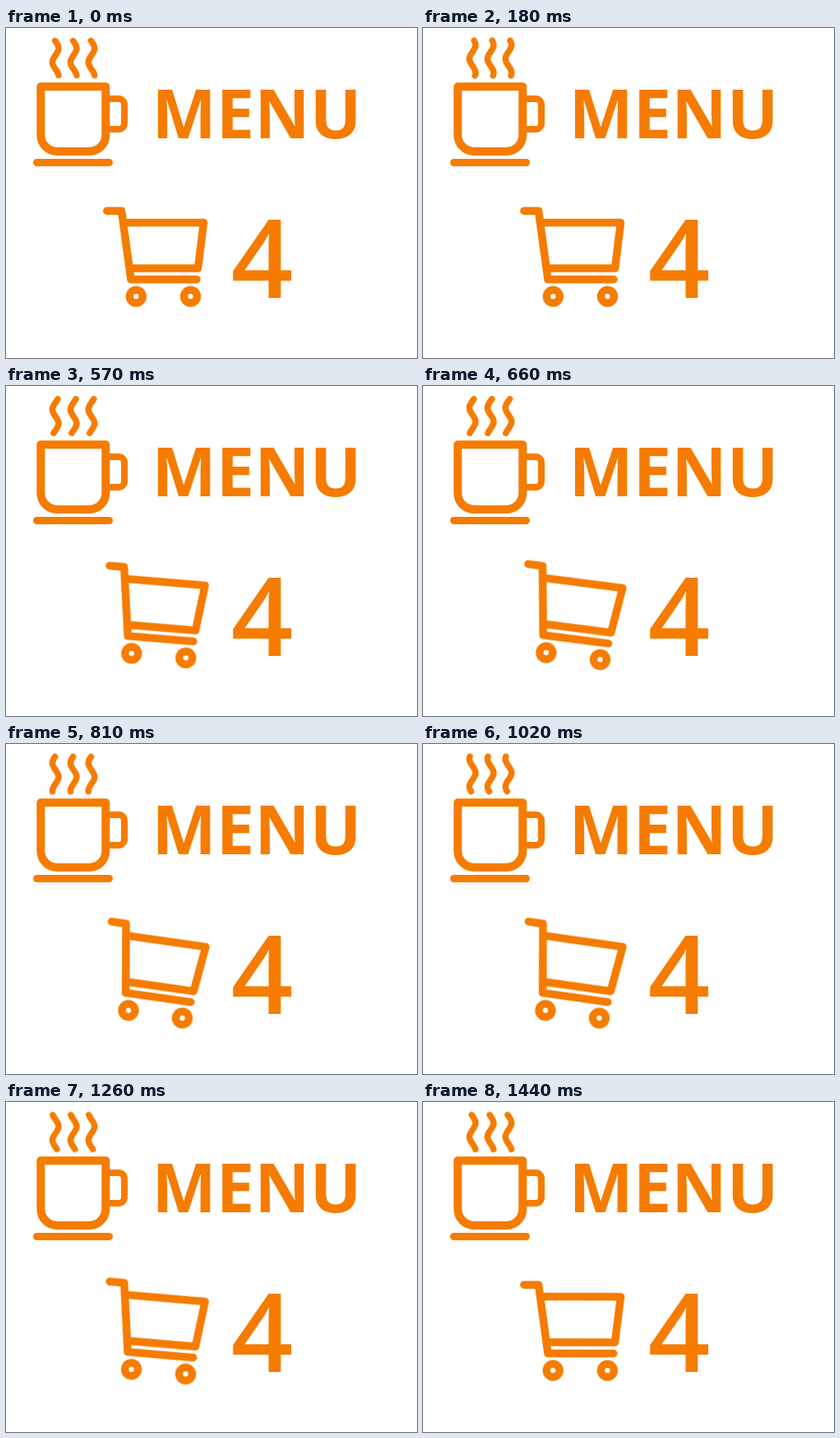
Recreate the animation shown at these times as an HTML page without scripts. Size 500 by 401 pixels, loop 1470 ms.

```html
<!DOCTYPE html>
<html lang="en">
<head>
<meta charset="utf-8">
<title>Menu and cart</title>
<style>
  html, body { margin: 0; width: 100%; height: 100%; overflow: hidden; background: #fff; }
  svg { display: block; width: 500px; height: 401px; }
  .line { fill: none; stroke: #f57c00; stroke-width: 9.5; stroke-linecap: round; stroke-linejoin: round; }
  text { fill: #f57c00; font-family: "Open Sans", "Noto Sans", sans-serif; }
  .menu { font-size: 83px; font-weight: 700; }
  .count { font-size: 132.5px; font-weight: 600; }

  /* The wave rises one wavelength while the dash keeps its visible window still. */
  .steam { stroke-width: 7.5; stroke-dasharray: 42 200; animation: rise 1470ms linear infinite; }
  @keyframes rise {
    from { transform: translateY(-8.8px); stroke-dashoffset: -24.3; }
    to { transform: translateY(-42.4px); stroke-dashoffset: -57.9; }
  }

  .cart { transform-origin: 171px 259px; animation: tilt 1470ms cubic-bezier(.37, 0, .63, 1) infinite; }
  @keyframes tilt {
    0%, 25%, 100% { transform: rotate(0deg); }
    50%, 75% { transform: rotate(8.1deg); }
  }
</style>
</head>
<body>
<svg viewBox="0 0 500 401">
  <defs>
    <path id="wave" pathLength="100.8" d="M3.8 0C3.8 6.1 -3.8 10.7 -3.8 16.8S3.8 27.5 3.8 33.6S-3.8 44.3 -3.8 50.4S3.8 61.1 3.8 67.2S-3.8 77.9 -3.8 84S3.8 94.7 3.8 100.8"/>
  </defs>

  <g class="line steam">
    <use href="#wave" x="60.2"/>
    <use href="#wave" x="82.2"/>
    <use href="#wave" x="104"/>
  </g>

  <g class="line">
    <path stroke-width="10" d="M42.3 71.3H121.3V130a20 20 0 0 1 -20 20H62.3a20 20 0 0 1 -20 -20Z"/>
    <path style="stroke-width:8" d="M122 86H137a7 7 0 0 1 7 7V116a7 7 0 0 1 -7 7H122"/>
    <path style="stroke-width:9" d="M37.5 163.5H125.5"/>
  </g>
  <text class="menu" x="177.5" y="134">MENU</text>

  <g class="line cart">
    <path d="M122.8 222.2H140.5L152 305.5H232"/>
    <path d="M144 236.5H240.5L233.5 292H151"/>
    <circle cx="158.3" cy="326.2" r="7.9"/>
    <circle cx="224.5" cy="326.2" r="7.9"/>
  </g>
  <text class="count" x="273.7" y="327.5">4</text>
</svg>
</body>
</html>
```
